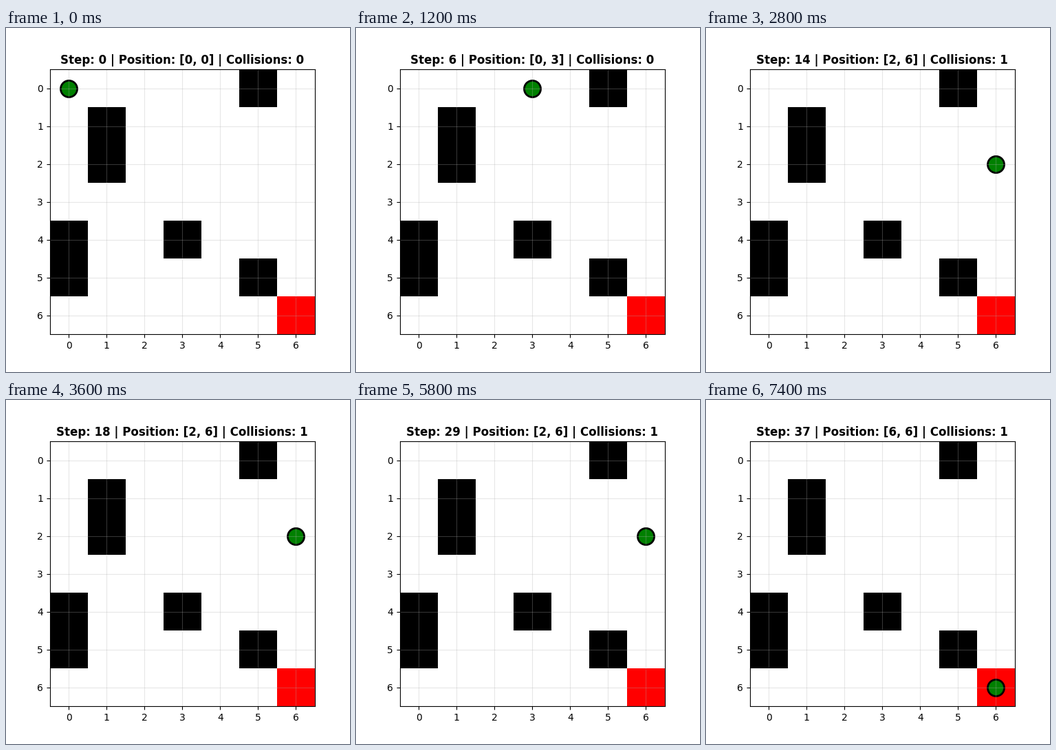
A matplotlib script that plays this animation: 500 by 500 pixels, repeating every 7600 ms.

```python
import numpy as np
import matplotlib.pyplot as plt
from matplotlib.animation import FuncAnimation

SIZE = 7
GOAL = (6, 6)
OBSTACLES = {(0, 5), (1, 1), (2, 1), (4, 0), (4, 3), (5, 0), (5, 5)}
STEPS = {"U": (-1, 0), "D": (1, 0), "L": (0, -1), "R": (0, 1)}
MOVES = "URURUR" "RRDRRD" "LRDURR" "LRRDRR" "URDURR" "RRRDDD" "D"


def walk(moves):
    """Return (row, col, collisions) after every move; borders just block."""
    row, col, hits = 0, 0, 0
    states = [(row, col, hits)]
    for move in moves:
        dr, dc = STEPS[move]
        r = min(max(row + dr, 0), SIZE - 1)
        c = min(max(col + dc, 0), SIZE - 1)
        if (r, c) in OBSTACLES:
            hits += 1
        else:
            row, col = r, c
        states.append((row, col, hits))
    return states


states = walk(MOVES)

grid = np.ones((SIZE, SIZE, 3))
for cell in OBSTACLES:
    grid[cell] = (0, 0, 0)
grid[GOAL] = (1, 0, 0)

fig, ax = plt.subplots(figsize=(5, 5), dpi=100)
ax.imshow(grid)
ax.set_xticks(range(SIZE))
ax.set_yticks(range(SIZE))
ax.grid(True, alpha=0.3)
agent = ax.scatter([0], [0], s=300, c="green", edgecolors="black", linewidths=2)
title = ax.set_title("", fontweight="bold")


def update(step):
    row, col, hits = states[step]
    agent.set_offsets([(col, row)])
    title.set_text(f"Step: {step} | Position: [{row}, {col}] | Collisions: {hits}")
    return agent, title


anim = FuncAnimation(fig, update, frames=len(states), interval=200,
                     repeat=True, repeat_delay=0, blit=False)
plt.show()
```
